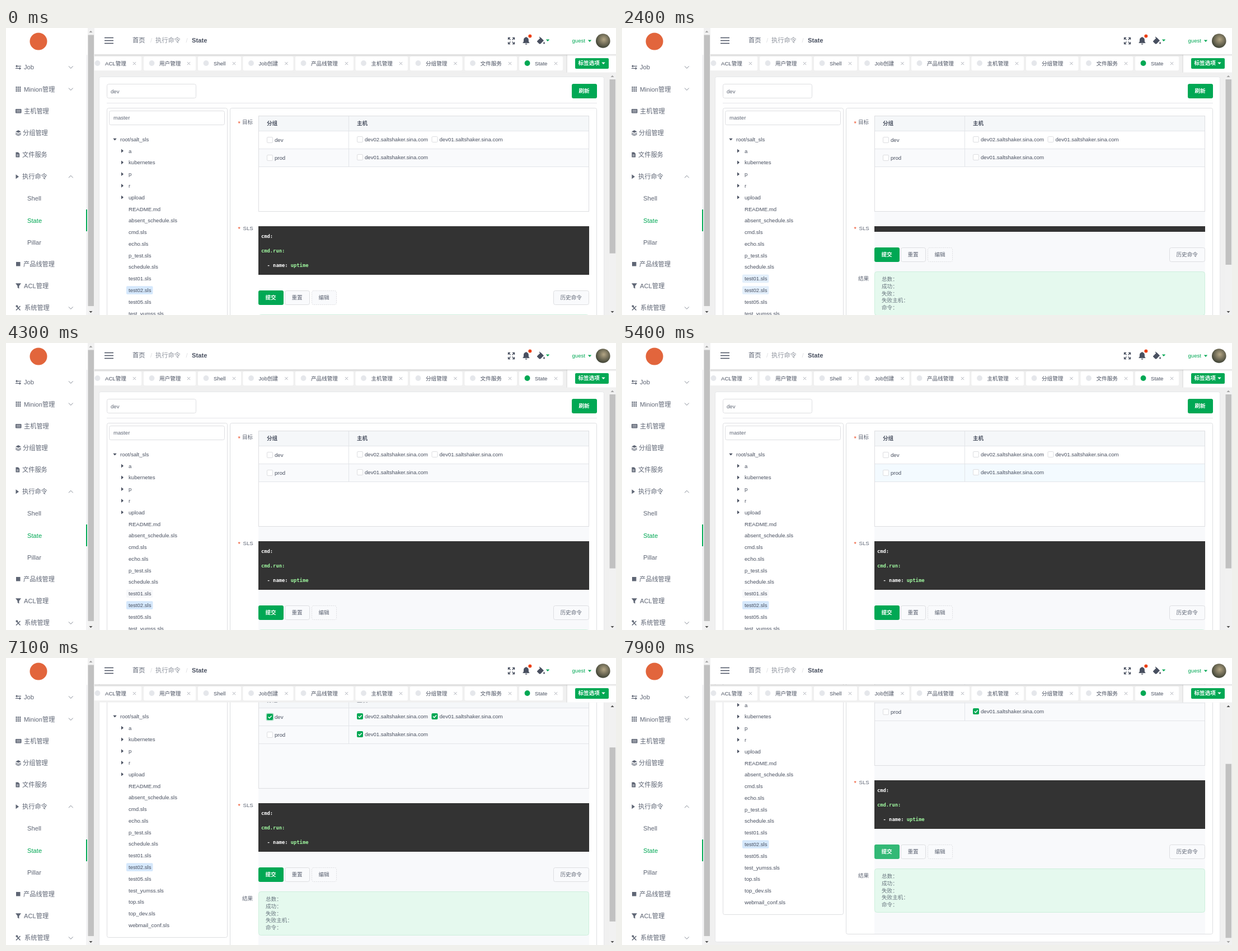
An HTML page for the animation above (8000 ms loop, 1090 by 514 pixels).

```html
<!DOCTYPE html>
<html lang="zh-CN">
<head>
<meta charset="utf-8">
<style>
html, body { margin: 0; width: 100%; height: 100%; overflow: hidden; background: #fff; }
svg { display: block; width: 1090px; height: 514px; }
text { font-family: "Liberation Sans", "Noto Sans CJK SC", "Noto Sans CJK", sans-serif; white-space: pre; }
.code { font-family: "DejaVu Sans Mono", monospace; font-weight: bold; }
.colon { font-family: "Noto Sans CJK JP", "Noto Sans CJK", sans-serif; }
</style>
</head>
<body>
<svg id="stage" viewBox="0 0 1090 514">
  <defs>
    <radialGradient id="avatar" cx=".55" cy=".4" r=".65">
      <stop offset="0" stop-color="#b3a685"/><stop offset=".5" stop-color="#75705a"/><stop offset="1" stop-color="#353b2f"/>
    </radialGradient>
    <linearGradient id="shade" x2="0" y2="1">
      <stop offset="0" stop-color="#000" stop-opacity=".13"/><stop offset="1" stop-color="#000" stop-opacity="0"/>
    </linearGradient>
  </defs>
  <g id="page"></g>
  <g id="frame"></g>
</svg>
<script>
const LOOP = 8000, TICK = 100;
const INK = '#495060', SOFT = '#5f6675', GREEN = '#00a854', LINE = '#dddee1', PALE = '#f9fafc', GREY = '#f0f0f0';
const SELECTED = '#d5e8fc', HOVER = '#eaf4fe', FADING = '#e3effb';

// Last value whose start time has been reached; steps = [time, value, time, value, ...]
function at(t, ...steps) {
  let value = steps[1];
  for (let i = 0; i < steps.length; i += 2) if (t >= steps[i]) value = steps[i + 1];
  return value;
}

const rect = (x, y, w, h, fill, extra = '') =>
  `<rect x="${x}" y="${y}" width="${w}" height="${h}" fill="${fill}" ${extra}/>`;
const box = (x, y, w, h, fill = '#fff', stroke = LINE, r = 3, extra = '') =>
  rect(x + .5, y + .5, w - 1, h - 1, fill, `stroke="${stroke}" rx="${r}" ${extra}`);
const circle = (x, y, r, fill) => `<circle cx="${x}" cy="${y}" r="${r}" fill="${fill}"/>`;
const shape = (d, fill = INK) => `<path d="${d}" fill="${fill}"/>`;
const stroke = (d, color = INK, w = 1) => `<path d="${d}" fill="none" stroke="${color}" stroke-width="${w}"/>`;
const text = (x, cy, str, fill = INK, size = 9.6, weight = 400) =>
  `<text x="${x}" y="${cy + size * .36}" font-size="${size}" font-weight="${weight}" fill="${fill}">${str}</text>`;
const caretDown = (x, y, fill, w = 3.2) => shape(`M${x - w} ${y - w / 2}h${2 * w}l${-w} ${w * 1.15}z`, fill);
const cross = (x, y) => stroke(`M${x - 2.6} ${y - 2.6}l5.2 5.2m0-5.2l-5.2 5.2`, '#a5a9b1', .9);

function button(x, y, w, label, primary) {
  return (primary ? rect(x, y, w, 26, primary, 'rx="3"') : box(x, y, w, 26, PALE)) +
    text(x + 12.5, y + 12.8, label, primary ? '#fff' : SOFT, 9.6, primary ? 700 : 400);
}

function checkbox(x, y, checked, border = LINE, halo = 0) {
  const ring = halo ? rect(x - 1.5, y - 1.5, 14, 14, GREEN, `rx="3" opacity="${halo}"`) : '';
  const mark = checked ? `<g opacity="${checked}">${rect(x, y, 11, 11, GREEN, 'rx="2"')}${
    stroke(`M${x + 2.6} ${y + 5.4}l2.2 2.3l3.8-4.3`, '#fff', 1.5)}</g>` : '';
  return ring + box(x, y, 11, 11, '#fff', border, 1.5) + mark;
}

const TREE = ['root/salt_sls', 'a', 'kubernetes', 'p', 'r', 'upload', 'README.md', 'absent_schedule.sls',
  'cmd.sls', 'echo.sls', 'p_test.sls', 'schedule.sls', 'test01.sls', 'test02.sls', 'test05.sls',
  'test_yumss.sls', 'top.sls', 'top_dev.sls', 'webmail_conf.sls'];

function tree(marks) {
  return TREE.map((name, i) => {
    const y = 199.4 + i * 20.78;
    const mark = marks[name] ? rect(215, y - 7.2, 47.5, 14.6, marks[name], 'rx="2"') : '';
    const arrow = i === 0 ? caretDown(194.5, y, INK)
      : i < 6 ? shape(`M206 ${y - 3.4}v6.6l4-3.3z`) : '';
    return mark + arrow + text(i ? 219 : 204, y, name);
  }).join('');
}

// Each line: indent, then text and colour in turn
const W = '#fff', G = '#a2fca2', R = '#d36363';
const CODE = {
  none: { rows: 0, lines: [] },
  cmd: { rows: 3, lines: [[0, 'cmd:', W], [0, 'cmd.run:', G], [2, '- name: ', W, 'uptime', G]] },
  nginx: { rows: 11, lines: [[0, '/etc/nginx:', G], [2, 'file.managed:', G],
    [4, '- source: salt://a/nginx.cong', W], [4, '- user: ', W, 'root', G],
    [4, '- group: ', W, 'root', G], [4, '- mode: ', W, '644', R]] }
};
const CODE_TOP = 355;

function codeBlock({ lines }, height) {
  const rows = lines.map(([indent, ...parts], i) => {
    let spans = '';
    for (let k = 0; k < parts.length; k += 2) spans += `<tspan fill="${parts[k + 1]}">${parts[k]}</tspan>`;
    return `<text class="code" font-size="8.77" x="${456 + indent * 5.28}" y="${376.4 + i * 25.6}">${spans}</text>`;
  });
  return rect(451, CODE_TOP, 591, height, '#333') + rows.join('');
}

const label = (x, y, str) => text(x, y, str, SOFT);
const star = y => text(414.5, y + 2, '*', '#ed3f14', 11);

function table(t) {
  const checked = at(t, 0, 0, 6500, .35, 6600, .8, 6700, 1);
  const host = (x, y, name) => checkbox(x, y - 5.5, checked) + text(x + 14, y, name + '.saltshaker.sina.com');
  return box(451, 157, 591, 172, t < 7000 ? '#fff' : PALE, LINE, 0) +
    rect(452, 158, 589, 26, '#f5f7f9') +
    rect(452, 184, 589, 32, at(t, 0, '#fff', 5500, '#f8fcff', 5600, '#f3f9fe', 7000, PALE)) +
    rect(452, 216, 589, 32, at(t, 0, PALE, 5400, '#f3faff', 5500, PALE)) +
    stroke('M452 184.5h589M452 216.5h589M452 248.5h589M612.5 158v90', '#e3e5e9') +
    text(466, 170.8, '分组', INK, 9.6, 700) + text(627, 170.8, '主机', INK, 9.6, 700) +
    checkbox(466, 195, checked, at(t, 0, LINE, 6200, '#cbcdd1', 6300, '#bcbcbc'), checked * .3) +
    text(480, 200.5, 'dev') + host(627, 199.5, 'dev02') + host(760.5, 199.5, 'dev01') +
    checkbox(466, 227, 0) + text(480, 232.5, 'prod') + host(627, 231.5, 'dev01');
}

function results(top) {
  return label(422, top + 13, '结果') + box(451, top, 591, 79, '#e5f9ee', '#cdefdc', 4) +
    ['总数', '成功', '失败', '失败主机', '命令'].map((s, i) =>
      text(464, top + 13.6 + i * 12.75, s + '<tspan class="colon">：</tspan>', '#6a7780')).join('');
}

function arrow(x, y, dir, active) {
  return shape(`M${x - 3} ${y + dir * -1.6}h6l-3 ${dir * 3.4}z`, active ? '#505050' : '#a3a3a3');
}

function page(t) {
  const code = CODE[at(t, 0, 'cmd', 2400, 'none', 2500, 'nginx', 4200, 'none', 4300, 'cmd')];
  const height = Math.round(10 + 25.6 * code.rows), bottom = CODE_TOP + height;
  const panelEnd = bottom + 189, cardEnd = Math.max(panelEnd, 596) + 14;
  const scroll = at(t, 0, 0, 7000, 27, 7100, 95, 7200, 130, 7300, 136);
  const ratio = 410 / (cardEnd - 74);
  const marks = {
    'test01.sls': at(t, 0, '', 700, '#f3f9fe', 800, HOVER, 2400, FADING, 2500, SELECTED, 4200, HOVER, 4300, '#f7f8fa', 7000, ''),
    'test02.sls': at(t, 0, SELECTED, 2400, FADING, 2500, '#f0f6fd', 4200, FADING, 4300, SELECTED)
  };
  const submit = at(t, 0, GREEN, 7800, '#1ab265', 7900, '#33b976');
  const tint = t < 2400 ? '' : rect(451, 329, 591, panelEnd - 330, '#f8f9fb');
  const actions = bottom + 28;
  return rect(158, 79, 932, 435, GREY) +
    `<g transform="translate(0 ${-scroll})">` +
    box(166, 87, 903, cardEnd - 87, '#fff', '#e6e7ea', 3) +
    box(180, 100, 160, 26) + text(187, 113.5, 'dev', SOFT) +
    button(1011, 100, 45, '刷新', GREEN) + stroke('M180 134.5h876', '#e4e5e8') +
    box(180, 143, 216, 453) + box(184, 148, 207, 26) + text(192, 160.5, 'master', SOFT) + tree(marks) +
    box(400, 143, 656, panelEnd - 143) + tint +
    star(169) + label(422, 169, '目标') + table(t) +
    star(358.5) + label(423.5, 358.5, 'SLS') + codeBlock(code, height) +
    button(451, actions, 45, '提交', submit) + button(498, actions, 45, '重置') +
    box(546, actions, 45, 26, PALE, LINE, 3, 'stroke-dasharray="2 1.5"') + text(558.5, actions + 12.8, '编辑', SOFT) +
    button(978, actions, 64, '历史命令') + results(bottom + 71) + '</g>' +
    rect(1078, 80, 12, 434, '#f1f1f1') +
    rect(1078.5, 92 + scroll * ratio, 10.5, 434 * ratio, '#c1c1c1') +
    arrow(1083.5, 86.5, -1, scroll > 0) + arrow(1083.5, 508.5, 1, scroll < 136);
}

const chevron = (y, up) => stroke(`M112 ${y + (up ? 2 : -2)}l3.8 ${up ? -4 : 4}l3.8 ${up ? 4 : -4}`, '#858b96');
const MENU = [[32, 'Job', 1], [32, 'Minion管理', 1], [32, '主机管理'], [30, '分组管理'], [29, '文件服务'],
  [29, '执行命令', 2], [38, 'Shell'], [38, 'State'], [38, 'Pillar'], [31, '产品线管理'], [32, 'ACL管理'], [33, '系统管理', 1]];

function menuIcons() {
  let dots = '';
  for (let i = 0; i < 9; i++) dots += rect(17.5 + i % 3 * 3.3, 105 + (i / 3 | 0) * 3.3, 2.3, 2.3, SOFT);
  return stroke('M19 68.3h8M17 72.3h8', SOFT, 1.2) + shape('M17 68.3l3-2.6v5.2zM27 72.3l-3-2.6v5.2z', SOFT) + dots +
    rect(17, 145, 10.5, 7.5, SOFT, 'rx="1"') + stroke('M18.5 147.3h7.5M18.5 150h7.5', '#fff', .8) +
    shape('M22 183l4.8 2.4l-4.8 2.4l-4.8-2.4z', SOFT) + stroke('M17.2 188l4.8 2.4l4.8-2.4M17.2 190.3l4.8 2.4l4.8-2.4', SOFT, 1.1) +
    shape('M17.5 222.5h4.2l2.5 2.5v6.5h-6.7z', SOFT) + stroke('M19 227h3.6M19 229h3.6', '#fff', .8) +
    shape('M17.5 262.3v8l5.5-4z', SOFT) + rect(18, 419, 7.5, 7.5, SOFT) +
    shape('M17 457.3h10l-3.6 4.6v4.8l-2.8-1.7v-3.1z', SOFT) +
    stroke('M18 505.5l7.5-7.5M18.5 498l7 7.5', SOFT, 1.5) + shape('M17 498l2.6-2l2.3 2.5l-2.4 2z', SOFT);
}

function sidebar(t) {
  const items = MENU.map(([x, name, kind], i) => {
    const y = 70.3 + i * 39.19;
    return text(x, y, name, name === 'State' ? GREEN : SOFT, 11.2) + (kind ? chevron(y, kind === 2) : '');
  });
  return rect(0, 0, 146, 514, '#fff') + stroke('M144.5 48v466', '#e3e4e7') +
    rect(143, 325, 2, 39, GREEN) + circle(58, 24, 15.5, '#e2653c') + items.join('') + menuIcons() +
    rect(146, 0, 12, 514, '#f1f1f1') +
    rect(146.5, 12.5, 10.5, 485.5, at(t, 0, '#c1c1c1', 500, '#a8a8a8', 700, '#b8b8b8', 800, '#c1c1c1')) +
    arrow(151.5, 6.5, -1, false) + arrow(151.5, 508.5, 1, true);
}

const TABS = [[149, 93, 'ACL管理'], [246, 93, '用户管理'], [343, 77, 'Shell'], [423.5, 90, 'Job创建'], [517, 104, '产品线管理'],
  [624.5, 93.5, '主机管理'], [722, 93.5, '分组管理'], [819.5, 93.5, '文件服务'], [917, 78, 'State']];

function header() {
  const tabs = TABS.map(([x, w, name]) => rect(x, 51, w, 25, '#fff', 'rx="2"') +
    circle(x + 14.5, 63, 4.9, name === 'State' ? GREEN : '#e5e7eb') + text(x + 28, 63.5, name) + cross(x + w - 12.5, 63.5));
  const expand = 'M897.5 21v-3.5h3.5M905 17.5h3.5v3.5M908.5 25v3.5h-3.5M901 28.5h-3.5v-3.5M898 18l3.5 3.5M908 18l-3.5 3.5M908 28l-3.5-3.5M898 28l3.5-3.5';
  return rect(158, 48, 932, 31.5, GREY) + tabs.join('') +
    rect(1001, 48, 2, 31.5, '#e6e6e6') + rect(1003, 48, 87, 31.5, '#fff') +
    rect(1017, 54, 60, 19, GREEN, 'rx="2"') + text(1022.5, 63, '标签选项', '#fff', 9.6, 700) + caretDown(1067.5, 63, '#fff') +
    rect(158, 0, 932, 47, '#fff') + rect(158, 47, 932, 4, 'url(#shade)') +
    stroke('M176 17.5h16M176 22.5h16M176 27.5h16', INK, 1.4) +
    text(226, 22, '首页', SOFT, 11.2) + text(258, 22, '/', LINE, 11.2) + text(267, 22, '执行命令', '#8f949e', 11.2) +
    text(321.5, 22, '/', LINE, 11.2) + text(332, 22, 'State', INK, 11.2, 700) +
    stroke(expand, INK, 1.3) +
    shape('M923 27c2-2 2-3 2-6c0-3 2-4 3.6-4.3c0-1.2 1.6-1.2 1.6 0c1.8.3 3.6 1.6 3.6 4.3c0 3 0 4 2 6zM927.5 28h4c-.6 2-3.4 2-4 0z') +
    circle(936.3, 14.5, 3, '#ed3f14') +
    shape('M949.5 23l6-6l5.5 5.5l-5.5 5.5c-1 1-2 1-3 0l-3-3c-.8-.8-.8-1.4 0-2zM961.5 24.5c2 3 1.6 4 0 4s-2-1 0-4z') +
    stroke('M953 16l3.5 3.5', INK, 1.2) + caretDown(968, 22, GREEN) +
    text(1011.5, 23, 'guest', GREEN) + caretDown(1043, 23, GREEN) + circle(1066.8, 23, 12.8, 'url(#avatar)');
}

const pageLayer = document.getElementById('page'), frameLayer = document.getElementById('frame');
let lastTick = -1;

function draw(now) {
  const t = Math.floor(now % LOOP / TICK) * TICK;
  if (t !== lastTick) {
    lastTick = t;
    pageLayer.innerHTML = page(t);
    frameLayer.innerHTML = header() + sidebar(t);
  }
}

const start = performance.now();
function loop() {
  draw(performance.now() - start);
  requestAnimationFrame(loop);
}
loop();
</script>
</body>
</html>
```
